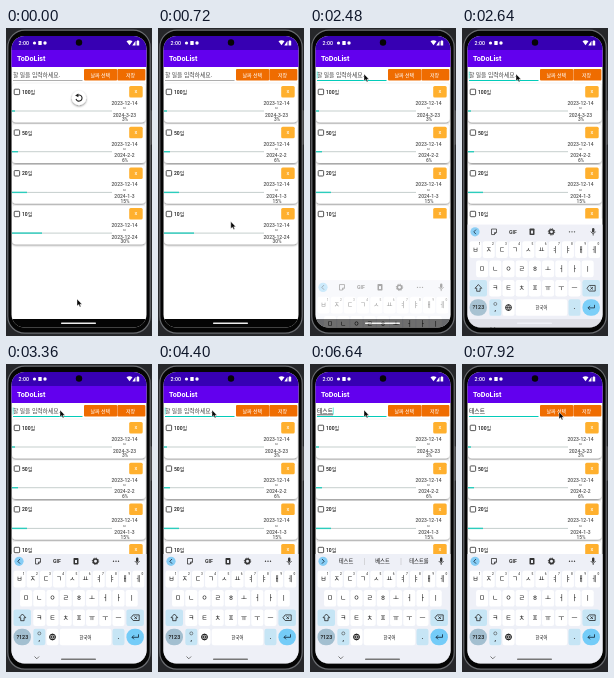
Recreate the animation shown at these times as an HTML page. Size 146x308 px, loop 8 s.

```html
<!DOCTYPE html>
<html lang="ko">
<head>
<meta charset="utf-8">
<title>ToDoList</title>
<style>
html, body { margin: 0; width: 100%; height: 100%; overflow: hidden; background: #26272a; }
svg { display: block; width: 146px; height: 308px; }
text { font-family: Roboto, "Noto Sans CJK KR", "Noto Sans CJK", sans-serif; }
#field, #cards text, #buttons text, #keys text, #words text { font-weight: 500; }
</style>
</head>
<body>
<svg id="stage" viewBox="0 0 146 308">
  <defs>
    <clipPath id="screen"><rect x="5.5" y="8" width="135" height="291.5" rx="13"/></clipPath>
    <clipPath id="list"><rect id="listClip" x="5" y="54" width="136" height="237"/></clipPath>
    <filter id="soft" x="-20%" y="-20%" width="140%" height="150%">
      <feDropShadow dx="0" dy="1" stdDeviation=".9" flood-opacity=".5"/>
    </filter>
  </defs>
  <rect x="143" y="82" width="2.5" height="35" rx="1" fill="#666"/>
  <rect x="1.8" y="2.2" width="142.4" height="303" rx="17" fill="#050505" stroke="#6a6c70" stroke-width="1.2"/>
  <g clip-path="url(#screen)">
    <rect x="5" y="8" width="136" height="292" fill="#fff"/>
    <rect x="5" y="8" width="136" height="14" fill="#3700b3"/>
    <rect x="5" y="22" width="136" height="17" fill="#6200ee"/>
    <g id="status" fill="#fff">
      <text x="12.5" y="17" font-size="5.3" font-weight="500">2:00</text>
      <circle cx="28.5" cy="15" r="1.6"/>
      <rect x="32.3" y="13" width="3.4" height="4" rx=".5"/>
      <circle cx="39" cy="15" r="1.7"/>
      <path d="M120.5 13.3q3-2 6 0l-3 4zM129.5 12.7v4.8h-3.2zM130.6 13h.7v-.7h1.2v.7h.7v4.5h-2.6z"/>
    </g>
    <circle cx="73" cy="14.5" r="3.2" fill="#050505"/>
    <text x="11" y="33.4" font-size="7.2" font-weight="700" fill="#fff">ToDoList</text>
    <text id="field" x="7" y="49.2" font-size="5.8"></text>
    <path id="compose" stroke="#222" stroke-width=".7"/>
    <path id="caret" stroke="#03dac5" stroke-width=".6"/>
    <path id="line" d="M7 52.5H76.5"/>
    <g id="buttons"></g>
    <g id="cards" clip-path="url(#list)"></g>
    <rect x="5" y="291" width="136" height="9" fill="#050505"/>
    <rect x="55" y="294.6" width="35" height="1.3" rx=".6" fill="#eee"/>
    <g id="keyboard">
      <rect x="5" y="190" width="136" height="111" fill="#eef0f7"/>
      <g id="tools"></g>
      <g id="words"></g>
      <g id="keys"></g>
    </g>
    <g id="spinner" filter="url(#soft)">
      <circle r="7.2" fill="#fff"/>
      <path d="M-2.1-2.3A3.1 3.1 0 1 1-3 1" fill="none" stroke="#222" stroke-width="1.1"/>
      <path d="M-3.9-2.5L-.6-4.6V-.7z" fill="#222"/>
    </g>
  </g>
  <path id="mouse" d="M0 0V7L1.7 5.6L2.9 8L4 7.5L2.9 5.2H5z" fill="#080808" stroke="#fff" stroke-width=".4"/>
</svg>
<script>
const $ = id => document.getElementById(id);
const rect = (x, y, w, h, r, fill, more = '') =>
  `<rect x="${x}" y="${y}" width="${w}" height="${h}" rx="${r}" fill="${fill}" ${more}/>`;
const label = (s, x, y, size, fill = '#333', anchor = 'middle', more = '') =>
  `<text x="${x}" y="${y}" font-size="${size}" fill="${fill}" text-anchor="${anchor}" ${more}>${s}</text>`;
const stroke = (d, color = '#333', w = .8) =>
  `<path d="${d}" fill="none" stroke="${color}" stroke-width="${w}"/>`;

$('buttons').innerHTML =
  rect(78, 41, 33.2, 11.6, 1, '#ef6c00') + rect(111.4, 41, 28, 11.6, 1, '#ef6c00') +
  label('날짜 선택', 94.3, 49, 5, '#fff') + label('저장', 124.5, 49, 5, '#fff');

const items = [
  ['100일', '2024-3-23', 3],
  ['50일', '2024-2-2', 6],
  ['20일', '2024-1-3', 15],
  ['10일', '2023-12-24', 30]
];
$('cards').innerHTML = items.map(([name, end, percent], i) =>
  `<g transform="translate(0 ${i * 40.7})">` +
  rect(6, 55.5, 133.5, 38.7, 4, '#fff', 'filter="url(#soft)"') +
  rect(8.2, 61.2, 5.4, 5.4, .7, 'none', 'stroke="#444" stroke-width=".9"') +
  label(name, 16, 66, 5, '#111', 'start') +
  rect(123.2, 58, 13.5, 11.5, 1.5, '#ffb02e') + label('X', 130, 65.4, 4.4, '#fff') +
  label('2023-12-14', 118.5, 77, 5, '#555') + label('~', 118.5, 82.4, 5, '#555') +
  label(end, 118.5, 88.6, 5, '#555') + label(percent + '%', 119, 93.2, 4.8, '#555') +
  rect(6, 82.5, 100, 1, 0, '#c6cfce') + rect(6, 82.3, percent, 1.4, 0, '#2ccdbd') +
  '</g>').join('');

const mic = rect(130, 193.5, 2.4, 4.5, 1.2, '#333') + stroke('M128.8 197q2.4 4 4.8 0M131.2 199v2');
const chevron = d => '<circle cx="13" cy="197.3" r="4.6" fill="#86cdf5"/>' + stroke(d, '#123');
$('tools').innerHTML = chevron('M14 195l-2.2 2.3 2.2 2.3') +
  stroke('M29.5 194.5h5v3.5l-2 2h-3zM32.5 200v-2h2') +
  label('GIF', 51, 199.3, 5.2, '#333', 'middle', 'font-weight="700"') +
  rect(67.5, 194, 5, 6.5, .8, '#333') + rect(69, 196, 2, 3, 0, '#eef0f7') +
  '<circle cx="89.5" cy="197.3" r="2.2" fill="none" stroke="#333" stroke-width="1.5"/>' +
  '<circle cx="89.5" cy="197.3" r="3.2" fill="none" stroke="#333" stroke-dasharray="1.2 1.3"/>' +
  [107.5, 110, 112.5].map(x => `<circle cx="${x}" cy="197.3" r=".7" fill="#333"/>`).join('') + mic;

const key = (s, x, y, w, fill = '#fff', size = 6.5) =>
  rect(x, y, w, 16.6, 2.2, fill) + label(s, x + w / 2, y + 10.2, size, '#111');
const row = (letters, x, y) =>
  [...letters].map((c, i) => key(c, x + i * 13.2, y, 12)).join('');
const blue = '#c6e5f5';
$('keys').innerHTML =
  row('ㅂㅈㄷㄱㅅㅛㅕㅑㅐㅔ', 7.5, 206.8) +
  [...'1234567890'].map((c, i) => label(c, 17.6 + i * 13.2, 210.6, 3.2, '#444')).join('') +
  row('ㅁㄴㅇㄹㅎㅗㅓㅏㅣ', 14.1, 226) +
  key('', 7.5, 245.4, 17.5, blue) + stroke('M16.4 250l3.4 3.7h-1.7v3h-3.4v-3h-1.7z', '#222') +
  row('ㅋㅌㅊㅍㅠㅜㅡ', 27.3, 245.4) +
  key('', 120.4, 245.4, 17.5, blue) + stroke('M125 253.7l2.2-2.8h6v5.6h-6zM128.4 252.4l2.6 2.6m0-2.6l-2.6 2.6', '#222') +
  rect(7.5, 264.7, 17.5, 16.6, 8, '#a3bfd0') + label('?123', 16.3, 274.9, 5.4, '#111') +
  rect(27.3, 264.7, 12, 16.6, 2.2, blue) + label(',', 33.3, 276.5, 6.5, '#111') +
  '<circle cx="33.3" cy="269.4" r="1.5" fill="none" stroke="#444" stroke-width=".6"/>' +
  key('', 40.5, 264.7, 12) + '<circle cx="46.5" cy="273" r="2.9" fill="none" stroke="#111"/>' +
  stroke('M43.6 273h5.8M46.5 270.1q-2.4 2.9 0 5.8q2.4-2.9 0-5.8', '#111', .7) +
  key('한국어', 53.7, 264.7, 51.6, '#fff', 4.4) +
  key('.', 106.5, 264.7, 12, blue) +
  rect(120.4, 264.7, 17.5, 16.6, 8, '#74ccf8') + stroke('M132.5 270.3v3h-6.5m2-2l-2 2 2 2', '#123') +
  stroke('M28.5 292.5l2.3 2.3 2.3-2.3', '#555') +
  rect(55, 294.6, 35, 1.3, .6, '#777');

const LOOP = 8000, STEP = 80;
const typed = [[5120, 'ㅌ'], [5360, '테'], [5520, '텟'], [5760, '테스'], [5920, '테슽'], [6160, '테스트']];
const path = [
  [0, 71, 271], [80, 72, 264], [160, 72, 255], [399, 72, 255], [400, 73, 200], [640, 73, 200],
  [1280, 68, 50], [1440, 68, 50], [2080, 54, 46], [7200, 54, 46], [7920, 97, 48]
];
const smooth = p => p * p * (3 - 2 * p);
const part = (t, from, to) => smooth(Math.min(1, Math.max(0, (t - from) / (to - from))));
const show = (id, on) => $(id).setAttribute('visibility', on ? 'visible' : 'hidden');

function mouseAt(t) {
  const i = path.findIndex(p => p[0] > t);
  if (i < 0) return path[path.length - 1].slice(1);
  const a = path[i - 1], b = path[i], k = part(t, a[0], b[0]);
  return [a[1] + (b[1] - a[1]) * k, a[2] + (b[2] - a[2]) * k];
}

let last = '';
function setWords(word) {
  if (word === last) return;
  last = word;
  const choices = word === '테스트' ? [word, '베스트', '테스트를'] : [word, word + '스', word + '트'];
  $('words').innerHTML = chevron('M12 195l2.2 2.3-2.2 2.3') +
    choices.map((s, i) => label(s, 36 + i * 36.5, 199.2, 5.3, '#111')).join('') +
    stroke('M54.5 194v7M91 194v7', '#bbb', .5) + mic;
}

function draw(t) {
  const word = typed.reduce((w, [at, s]) => t >= at ? s : w, '');
  const composing = word && t < 7200;
  const focused = t >= 2240, open = part(t, 2300, 2700);
  const end = 7 + word.length * 5.35;

  $('mouse').setAttribute('transform', `translate(${mouseAt(t)})`);
  const shrink = 1 - part(t, 0, 160);
  $('spinner').setAttribute('transform', `translate(73 70) scale(${shrink})`);
  show('spinner', shrink > 0);

  $('field').textContent = word || '할 일을 입력하세요.';
  $('field').setAttribute('fill', word ? '#111' : '#444');
  $('compose').setAttribute('d', `M7 50.8H${end}`);
  show('compose', composing);
  $('caret').setAttribute('d', `M${end + .2} 43.5V50.5`);
  show('caret', focused && (t - 2240) % 1000 < 500);
  $('line').setAttribute('stroke', focused ? '#03cbb9' : '#777');
  $('line').setAttribute('stroke-width', focused ? 1 : .6);

  $('listClip').setAttribute('height', t >= 2320 ? 136.5 : 237);
  $('keyboard').setAttribute('transform', `translate(0 ${108 * (1 - open)})`);
  $('keyboard').setAttribute('opacity', open);
  if (composing) setWords(word);
  show('words', composing);
  show('tools', !composing);
}

const start = performance.now();
function tick() {
  const t = Math.max(0, performance.now() - start) % LOOP;
  draw(Math.floor(t / STEP) * STEP);
  requestAnimationFrame(tick);
}
tick();
</script>
</body>
</html>
```
